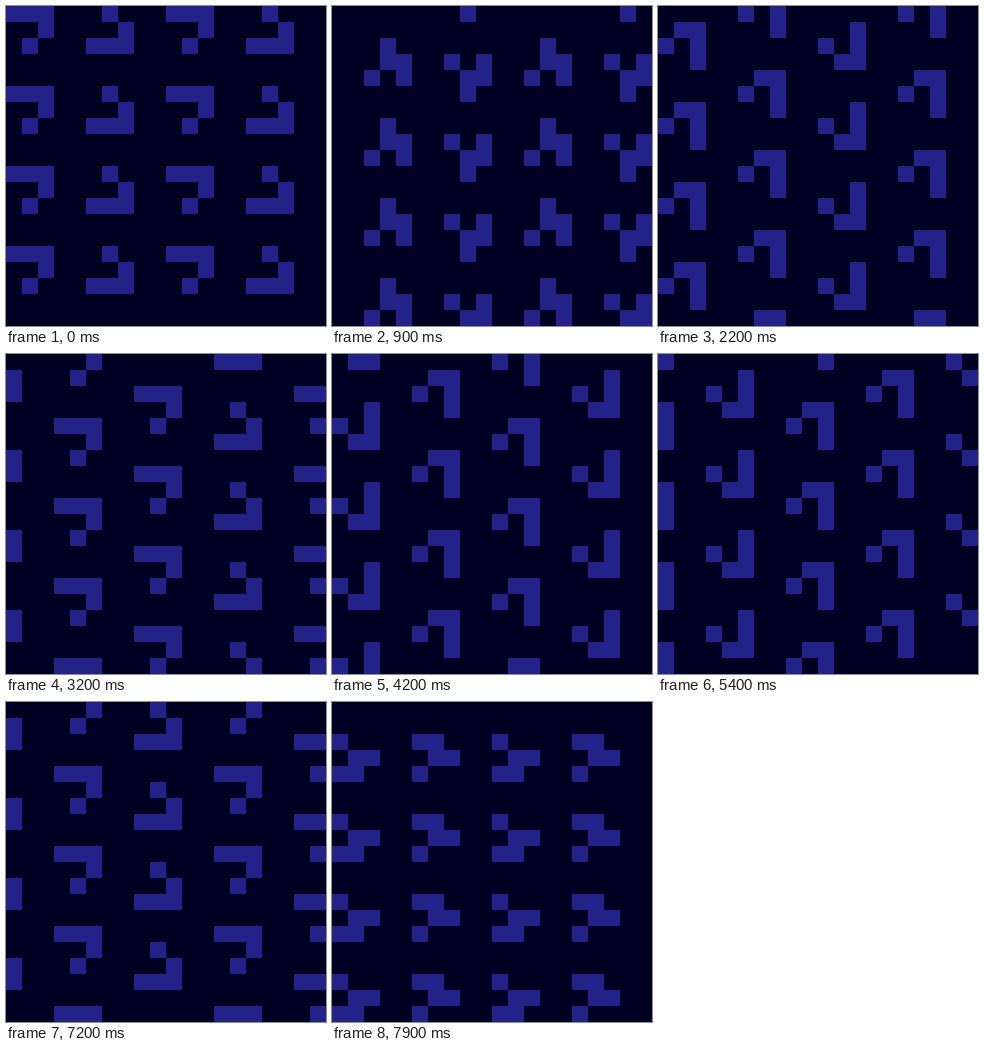
Write an HTML page with a canvas that moves like this. It is 320 px wide and 320 px high and loops after 8000 ms.

```html
<!DOCTYPE html>
<html lang="en">
<head>
<meta charset="utf-8">
<title>Gliders</title>
<style>
  html, body { margin: 0; width: 100%; height: 100%; overflow: hidden; background: #000022; }
  canvas { display: block; width: 320px; height: 320px; }
</style>
</head>
<body>
<canvas id="stage" width="320" height="320"></canvas>
<script>
const CELL = 16, GRID = 20, GAP = 5;
const STEP_MS = 100, STEPS = 80;
const GLIDER = ['.#.', '..#', '###'];

// The pattern repeats every GAP rows, so the world is one such band.
// Its left third waits off stage; its right third takes what leaves.
const WIDTH = 3 * GRID, COLUMNS = 2 * GRID / GAP;
const ctx = document.getElementById('stage').getContext('2d');

const wrap = (n, size) => (n + size) % size;
const emptyWorld = () => Array.from({ length: GAP }, () => new Array(WIDTH).fill(0));

// Gliders head up and down by turns; the waiting half starts lower.
function seedWorld() {
  const world = emptyWorld();
  for (let i = 0; i < COLUMNS; i++) {
    const waiting = i < COLUMNS / 2;
    const up = (i % 2 === 1) === waiting;
    const rows = up ? [...GLIDER].reverse() : GLIDER;
    rows.forEach((row, y) => [...row].forEach((mark, x) => {
      const top = wrap(y + (waiting ? 2 : 0), GAP);
      if (mark === '#') world[top][i * GAP + x] = 1;
    }));
  }
  return world;
}

function countAround(world, x, y) {
  let sum = -world[y][x];
  for (let dy = -1; dy <= 1; dy++) {
    for (let dx = -1; dx <= 1; dx++) {
      sum += world[wrap(y + dy, GAP)][wrap(x + dx, WIDTH)];
    }
  }
  return sum;
}

// Conway's Game of Life
const nextWorld = world => world.map((row, y) => row.map((alive, x) => {
  const around = countAround(world, x, y);
  return around === 3 || (alive && around === 2) ? 1 : 0;
}));

const history = [seedWorld()];
while (history.length < STEPS) history.push(nextWorld(history[history.length - 1]));

function draw(world) {
  ctx.fillStyle = '#000022';
  ctx.fillRect(0, 0, GRID * CELL, GRID * CELL);
  ctx.fillStyle = '#222288';
  for (let y = 0; y < GRID; y++) {
    for (let x = 0; x < GRID; x++) {
      if (world[y % GAP][x + GRID]) ctx.fillRect(x * CELL, y * CELL, CELL, CELL);
    }
  }
}

let shown = -1;
function tick() {
  const gen = Math.floor(performance.now() / STEP_MS) % STEPS;
  if (gen !== shown) draw(history[shown = gen]);
  requestAnimationFrame(tick);
}
tick();
</script>
</body>
</html>
```
